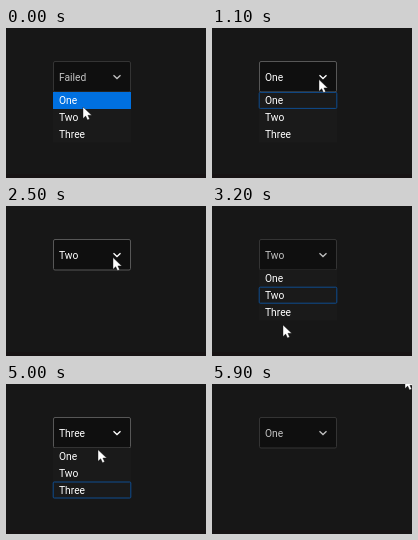
Write an HTML page that moves like this. It is 200 by 150 pixels and loops after 6000 ms.

```html
<!DOCTYPE html>
<html lang="en">
<head>
<meta charset="utf-8">
<title>Dropdown</title>
<style>
  html, body { margin: 0; width: 100%; height: 100%; overflow: hidden; background: #171717; }
  svg { display: block; width: 100vw; height: 100vh; }
  text { font: 10.25px Roboto, "Noto Sans", sans-serif; fill: #fff; }
</style>
</head>
<body>
<svg viewBox="0 0 200 150">
  <rect width="200" height="150" fill="#171717"/>
  <rect y="146" width="200" height="4" fill="#171314"/>
  <rect id="box" x="47.5" y="33.5" width="77" height="30.5" rx="1.5" fill="#0f0f0f"/>
  <text id="label" x="53" y="52.5"></text>
  <path id="chevron" d="M107.5 47.2l3.5 3.3 3.5-3.3" fill="none" stroke-width="1.3"/>
  <g id="list">
    <rect x="47" y="64" width="78" height="50.5" fill="#1a1a1a"/>
    <rect id="fill" x="47" width="78" height="17" fill="#0070e0"/>
    <rect id="outline" x="47.2" width="77.6" height="16" rx="1" fill="none" stroke="#0e4c8f"/>
  </g>
  <path id="cursor" d="M0 0V11.6L2.7 9.1L4.5 13L6.6 12.1L4.9 8.3H8.7Z" fill="#fff" stroke="#111" stroke-width=".4"/>
</svg>
<script>
const LOOP = 6000, STEP = 100, ROW_TOP = 64, ROW = 16.8;
const LABEL_DELAY = 200, SETTLED = 3;
const options = ['One', 'Two', 'Three'];
const [box, label, chevron, list, fill, outline, cursor] =
  ['box', 'label', 'chevron', 'list', 'fill', 'outline', 'cursor']
    .map(id => document.getElementById(id));

// each round opens the list and picks one option
const rounds = [
  { open: 0, close: 400, pick: 0 },
  { open: 1100, close: 1900, pick: 1 },
  { open: 2900, close: 3700, pick: 2 },
  { open: 4800, close: 5600, pick: 0 }
];

const start = { x: 77, y: 79 }, button = { x: 107, y: 51.6 };
const moves = [
  { at: 500, time: 300, to: button },
  { at: 1100, time: 300, to: { x: 77, y: 93 } },
  { at: 2200, time: 300, to: button },
  { at: 2900, time: 300, to: { x: 71, y: 119 } },
  { at: 3200, time: 200, to: { x: 72, y: 111 } },
  { at: 4100, time: 100, to: { x: 118, y: 69 } },
  { at: 4200, time: 400, to: button },
  { at: 4800, time: 600, to: { x: 80, y: 77 } },
  { at: 5700, time: 200, to: { x: 193, y: -7 } }
];

options.forEach((name, i) => {
  const text = document.createElementNS('http://www.w3.org/2000/svg', 'text');
  text.textContent = name;
  text.setAttribute('x', 53);
  text.setAttribute('y', 76 + i * 17);
  list.append(text);
});

const easeOut = k => 1 - (1 - k) ** 2;

function pointer(t) {
  return moves.filter(m => m.at < t).reduce((p, { at, time, to }) => {
    const e = easeOut(Math.min(1, (t - at) / time));
    return { x: p.x + (to.x - p.x) * e, y: p.y + (to.y - p.y) * e };
  }, start);
}

function show(node, visible) {
  node.setAttribute('visibility', visible ? 'inherit' : 'hidden');
}

function render(now) {
  const t = Math.floor(now % LOOP / STEP) * STEP;
  const tip = pointer(t);
  cursor.setAttribute('transform', `translate(${tip.x} ${tip.y})`);

  // hover feedback trails the pointer by one step
  const last = pointer(t - STEP);
  const inside = last.x >= 47 && last.x < 125;
  const hover = inside && last.y >= 33 && last.y < ROW_TOP;
  box.setAttribute('stroke', hover ? '#575757' : '#343434');
  label.style.fill = hover ? '#fff' : '#c4c4c4';
  chevron.setAttribute('stroke', hover ? '#fff' : '#c0c0c0');

  const picked = rounds.filter(r => t >= r.close + LABEL_DELAY).pop();
  label.textContent = picked ? options[picked.pick] : 'Failed';

  show(list, rounds.some(r => t >= r.open && t < r.close));

  // a row lights up only once the pointer comes to rest on it
  const row = Math.floor((last.y - ROW_TOP) / ROW);
  const settled = Math.hypot(tip.x - last.x, tip.y - last.y) < SETTLED;
  const lit = inside && settled && row >= 0 && row < options.length;
  show(fill, lit);
  fill.setAttribute('y', ROW_TOP + row * ROW);
  show(outline, picked && !lit);
  outline.setAttribute('y', ROW_TOP + .4 + (picked ? picked.pick * ROW : 0));

  requestAnimationFrame(render);
}
render(0);
</script>
</body>
</html>
```
